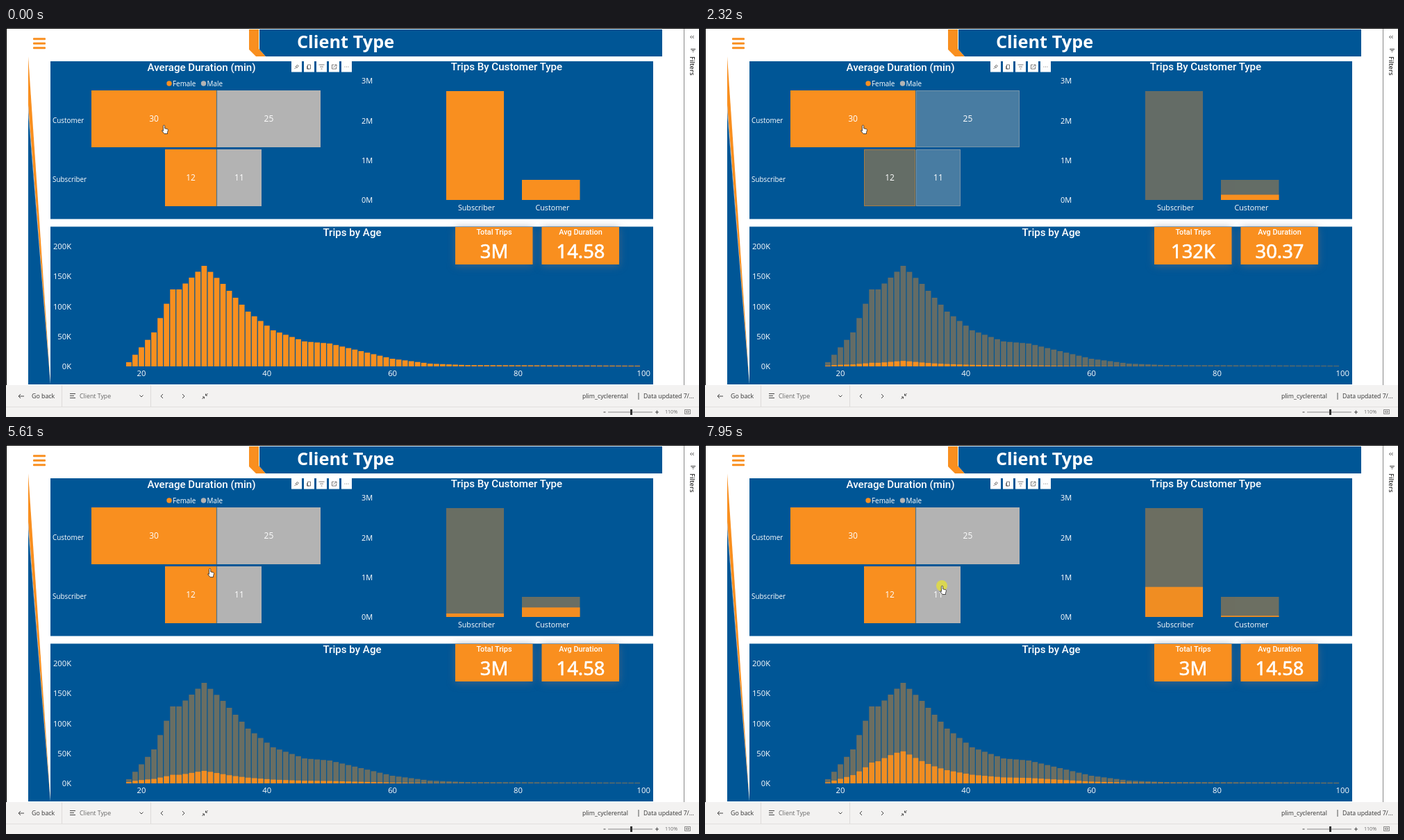
Write an HTML page that moves like this. It is 998x561 px and loops after 8 s.

```html
<!DOCTYPE html>
<html lang="en">
<head>
<meta charset="utf-8">
<title>Client Type dashboard</title>
<style>
  html, body { margin: 0; width: 100%; height: 100%; overflow: hidden; background: #fff; }
  svg { display: block; width: 998px; height: 561px; }
  text { font-family: "Open Sans", sans-serif; fill: #fff; white-space: pre; }
  .din { font-family: Roboto, sans-serif; font-weight: 500; }
  .head { font-family: "Noto Sans", sans-serif; font-weight: 700; }
  .value { font-family: "Noto Sans", sans-serif; stroke: #fff; stroke-width: .6; }
  .dark { fill: #333; }
  .muted { fill: #666; }
  .mid { text-anchor: middle; }
  .end { text-anchor: end; }
  .line { fill: none; stroke: #444; }
  .card { filter: drop-shadow(0 2px 6px rgba(90, 105, 130, .7)); }
</style>
</head>
<body>
<svg id="stage" viewBox="0 0 998 561"></svg>
<script>
const BLUE = '#005696', ORANGE = '#f98f1f', GRAY = '#b3b3b3';
const LOOP = 8000, BASE = 488, PITCH = 9.04, NONE = -1;

const rect = (x, y, w, h, fill, extra = '') =>
  `<rect x="${x}" y="${y}" width="${w}" height="${h}" fill="${fill}" ${extra}/>`;
const path = (d, fill, extra = '') => `<path d="${d}" fill="${fill}" ${extra}/>`;
const line = (d, extra = '') => `<path class="line" d="${d}" ${extra}/>`;
// y is the middle of the capitals
const text = (x, y, size, str, cls = '', extra = '') =>
  `<text x="${x}" y="${y + size * .36}" font-size="${size}" class="${cls}" ${extra}>${str}</text>`;

const slices = [
  { x: 123, y: 90, w: 180.2, fill: ORANGE, label: 30, total: '132K', avg: '30.37' },
  { x: 303.8, y: 90, w: 149.2, fill: GRAY, label: 25, total: '232K', avg: '25.05' },
  { x: 229, y: 175, w: 74.2, fill: ORANGE, label: 12, total: '629K', avg: '12.46' },
  { x: 303.8, y: 175, w: 64.2, fill: GRAY, label: 11 }
];
const everyone = { total: '3M', avg: '14.58' };

// Each bar has a height and the share that each slice highlights
const typeBars = [
  { x: 634, w: 83, base: 248, h: 157, share: [0, 0, .229] },
  { x: 743, w: 83.5, base: 248, h: 29, share: [.26, .455, 0] }
];

const agePoints = [[18, 6], [22, 49], [25, 111], [26, 111], [30, 145], [33, 119], [37, 79],
  [41, 52], [46, 36], [50, 33], [60, 11], [66, 4], [72, 1.8], [99, 1]];
function ageHeight(age) {
  const i = Math.max(1, agePoints.findIndex(([a]) => a >= age));
  const [a0, h0] = agePoints[i - 1], [a1, h1] = agePoints[i];
  return h0 + (h1 - h0) * (age - a0) / (a1 - a0);
}
const bell = (a, mid, spread) => Math.exp(-(((a - mid) / spread) ** 2));
function ageShares(age) {
  const customer = .075 + .2 * Math.exp((18 - age) / 2) + .02 * bell(age, 30, 3);
  return [.57 * customer, customer, .19 + .09 * bell(age, 29, 4)];
}
const ageBars = Array.from({ length: 82 }, (_, i) => i + 18).map(age => ({
  x: 195 + (age - 20) * PITCH - 3.9, w: 7.8, base: BASE, h: ageHeight(age), share: ageShares(age)
}));

function barLayers(id, bars) {
  const layer = name => `<g id="${id}${name}">` +
    bars.map(b => rect(b.x, b.base - b.h, b.w, b.h, ORANGE)).join('') + '</g>';
  return layer('Base') + layer('Part');
}

function toolbar() {
  const glyphs = ['M-3 3l2-2M-2-1l3 3M-1 0l2-3 2 2-3 2', 'M-2-3h4v6h-4zM-2-1h-1v4h3',
    'M-4-3h8M-2.5 0h5M-1 3h2', 'M0-3h-3v6h6V0M1-3h2.5v2.5M3-3L-1 1', 'M-3 0h1M-.5 0h1M2 0h1'];
  return glyphs.map((d, i) => rect(411 + 18 * i, 48, 15, 15.5, '#fff') +
    line(d, `transform="translate(${418.5 + 18 * i} 56)" stroke-width=".7"`)).join('');
}

function card(x, title, id) {
  return rect(x, 287, 111.5, 54, ORANGE, 'class="card"') +
    text(x + 56, 294, 10.9, title, 'din mid') +
    text(x + 56, 322, 27.4, '', 'value mid', `id="${id}"`);
}

function header() {
  return path('M350 2h14v28l10 11h-14l-10-10z', ORANGE) +
    path('M365 2H945v39H374l-9-10z', BLUE) +
    text(419, 20.3, 25.3, 'Client Type', 'head') +
    [14.2, 20.7, 27.2].map(y => rect(39, y, 18, 3, ORANGE, 'rx="1"')).join('') +
    path('M32 41L64 514 32 112z', ORANGE) +
    path('M32 110L64 514 32 126z', GRAY) +
    path('M32 122L64 514H32z', BLUE);
}

function charts() {
  return rect(64, 48, 868, 227.5, BLUE) + rect(64, 286.5, 868, 227.5, BLUE) +
    text(281.5, 57, 15.1, 'Average Duration (min)', 'din mid') +
    text(721, 56, 15.1, 'Trips By Customer Type', 'din mid') +
    text(498.5, 295, 15.1, 'Trips by Age', 'din mid') +
    [[235, ORANGE, 'Female'], [284.5, GRAY, 'Male']].map(([x, fill, name]) =>
      `<circle cx="${x}" cy="80" r="3.7" fill="${fill}"/>` + text(x + 5, 80, 9.9, name)).join('') +
    text(67, 133.5, 9.9, 'Customer') + text(67, 218.5, 9.9, 'Subscriber') +
    slices.map(s =>
      rect(s.x + .5, s.y + .5, s.w - 1, 81, s.fill, `class="slice" stroke="${s.fill}"`) +
      text(s.x + s.w / 2, s.y + 41, 12, s.label, 'mid')).join('') +
    [0, 1, 2, 3].map(n => text(512, 248 - n * 57.2, 11, n + 'M')).join('') +
    text(677.5, 258.7, 10.7, 'Subscriber', 'mid') + text(787, 258.7, 10.7, 'Customer', 'mid') +
    [0, 50, 100, 150, 200].map(n => text(94, BASE - n * .865, 11.2, n + 'K', 'end')).join('') +
    [20, 40, 60, 80, 100].map(n => text(195 + (n - 20) * PITCH, 498, 11.3, n, 'mid')).join('') +
    barLayers('type', typeBars) + barLayers('age', ageBars) +
    card(647, 'Total Trips', 'total') + card(771.5, 'Avg Duration', 'avg') + toolbar();
}

function chrome() {
  return rect(0, 0, 998, 1, '#000') + rect(0, 0, 1, 515, '#000') + rect(976, 1, 1, 514, '#888') +
    line('M987.5 11l-2 2 2 2M990.5 11l-2 2 2 2M986 30.5h7M987.5 32.5h4M989 34.5h1') +
    text(0, 0, 9.2, 'Filters', 'dark', 'font-weight="600" transform="translate(988 41) rotate(90)"') +
    rect(0, 515, 998, 46, '#f3f2f1') + rect(0, 546, 998, 1, '#e1dfdd') +
    rect(80, 515, 1, 31, '#dddbd9') + rect(208, 515, 1, 31, '#dddbd9') +
    line('M26 531h-8M21 528l-3 3 3 3') + text(37, 531, 8.8, 'Go back', 'dark') +
    line('M92 527.5h8M92 530.5h6M92 533.5h8') + text(106, 531, 8.8, 'Client Type', 'muted') +
    line('M192.5 529.5l2.5 2.5 2.5-2.5M226 528l-3 3 3 3M254 528l3 3-3 3') +
    line('M290.5 527l-3 3M287.5 527.5v2.5h2.5M282.5 535l3-3M283 532h2.5v2.5') +
    text(830, 531, 8.8, 'plim_cyclerental', 'dark') + rect(910.5, 526, 1, 10, '#555') +
    text(918, 531, 8.7, 'Data updated 7/...', 'dark') +
    line('M860.5 554h3M935 554h5M937.5 551.5v5') + rect(867, 553.5, 64, 1, '#888') +
    rect(899, 550, 3, 8, '#333') + text(949, 553.5, 7.1, '110%', 'muted') +
    line('M977.5 550.5h8v6h-8zM979.5 552.5h4v2h-4z', 'stroke-width=".6"');
}

function pointer() {
  return '<g id="pointer"><circle id="tap" r="8" fill="rgba(252,243,0,.54)"/>' +
    path('M-.6 7V1.3a1.1 1.1 0 0 1 2.2 0V4.8l3.7.8q1.3.4 1.1 2L5.5 10.5V12.5H1L-2.6 8.3q-.2-1.6 2 .2z',
      '#fff', 'stroke="#222" stroke-width=".8"') + '</g>';
}

document.getElementById('stage').innerHTML =
  rect(0, 0, 998, 561, '#fff') + header() + charts() + chrome() + pointer();

// Clicks: when the tap shows and lifts, then when slices, bars, cards and age bars respond
const click = (slice, tap, lift, react, bars, cards, ages = bars) =>
  ({ slice, tap, lift, react, bars, cards, ages });
const clicks = [
  click(NONE, -LOOP, -LOOP, -LOOP, -LOOP, -LOOP),
  click(0, 520, 1840, 650, 1748, 2180),
  click(NONE, 2580, 2660, 2660, 2800, 2660),
  click(1, 3050, 3200, 3120, 3900, 3980),
  click(NONE, 5070, 5210, 5210, 5596, 5480),
  click(2, 5940, 6400, 6020, 6488, 6470, 6550),
  click(NONE, 7420, 7510, 7510, 7930, 7600),
  click(3, 7950, LOOP, LOOP, LOOP, LOOP)
];
const moves = [
  { x: 333, y: 135, start: 2700, time: 270 },
  { x: 270, y: 203, start: 5434, time: 300 },
  { x: 341, y: 203, start: 7560, time: 300 }
];
const FADE = 140, AVG_LAG = 90;

const el = id => document.getElementById(id);
const sliceRects = document.querySelectorAll('.slice');
const latest = (stage, t) => clicks.findLast(c => c[stage] <= t);
const ease = x => {
  const k = Math.min(1, Math.max(0, x));
  return k * k * (3 - 2 * k);
};

// Selecting shrinks the highlight to its share and dims the rest; clearing runs it backwards
function drawBars(id, bars, stage, t) {
  const { slice, [stage]: start } = latest(stage, t);
  const ramp = ease((t - start) / FADE);
  const strength = slice === NONE ? 1 - ramp : ramp;
  const source = clicks.findLast(c => c.slice !== NONE && c[stage] <= t)?.slice ?? 0;
  el(id + 'Base').setAttribute('opacity', 1 - .6 * strength);
  el(id + 'Part').setAttribute('opacity', strength);
  bars.forEach((b, i) => {
    const h = b.h * (1 - (1 - b.share[source]) * strength);
    const bar = el(id + 'Part').children[i];
    bar.setAttribute('y', b.base - h);
    bar.setAttribute('height', h);
  });
}

function draw(t) {
  const selected = latest('react', t).slice;
  sliceRects.forEach((s, i) => {
    const dim = selected !== NONE && selected !== i;
    s.setAttribute('fill-opacity', dim ? .4 : 1);
    s.setAttribute('stroke-opacity', dim ? .6 : 1);
  });
  drawBars('type', typeBars, 'bars', t);
  drawBars('age', ageBars, 'ages', t);

  const summary = time => slices[latest('cards', time).slice] ?? everyone;
  el('total').textContent = summary(t).total;
  el('avg').textContent = summary(t - AVG_LAG).avg;

  let x = 227, y = 140;
  for (const m of moves) {
    const k = ease((t - m.start) / m.time);
    x += (m.x - x) * k;
    y += (m.y - y) * k;
  }
  el('pointer').setAttribute('transform', `translate(${x} ${y})`);
  el('tap').setAttribute('opacity', t < latest('tap', t).lift ? 1 : 0);
}

const begin = performance.now();
function loop() {
  draw((performance.now() - begin) % LOOP);
  requestAnimationFrame(loop);
}
loop();
</script>
</body>
</html>
```
